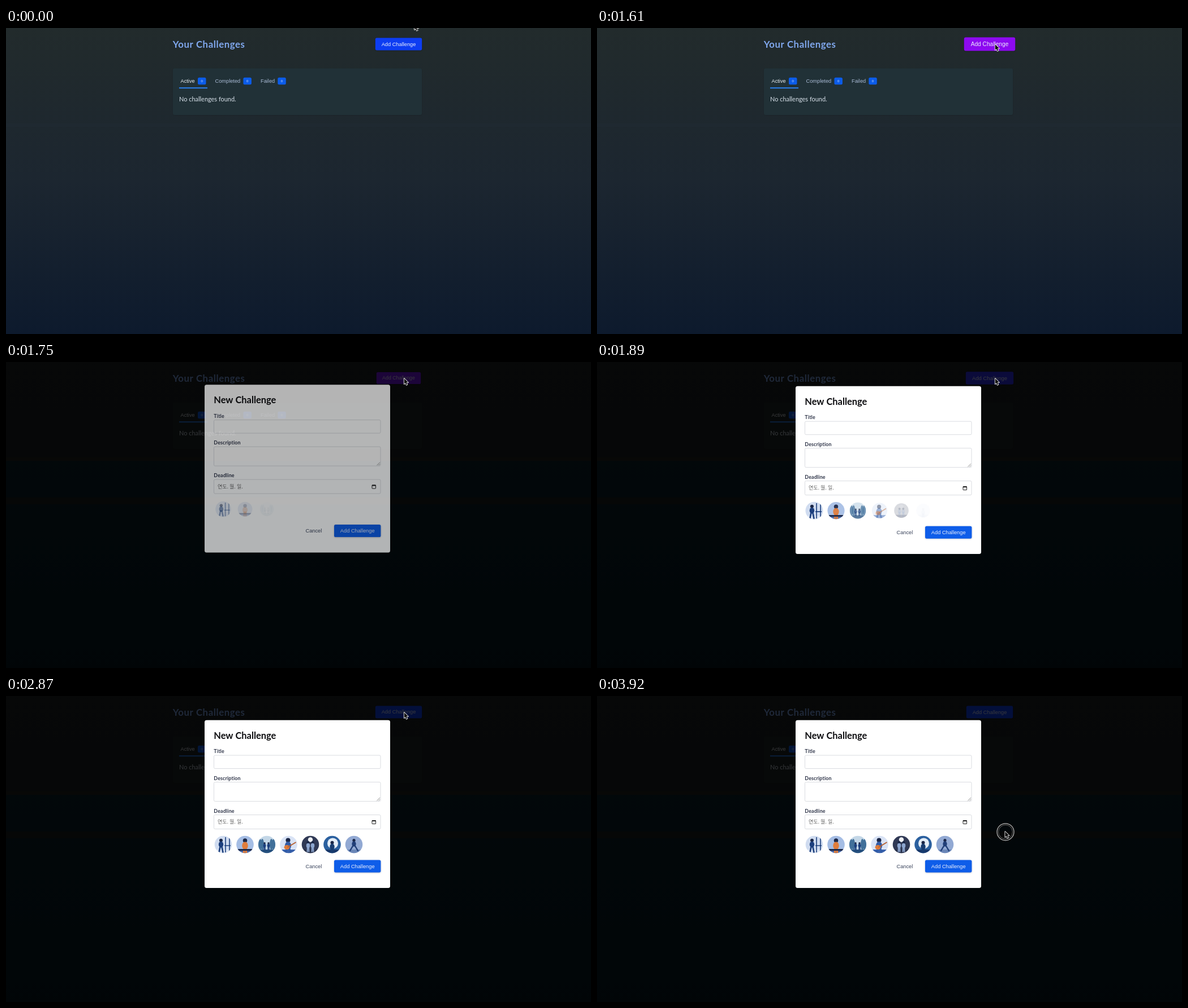
Recreate the animation shown at these times as an HTML page with a canvas. Size 1034 by 542 pixels, loop 3990 ms.

```html
<!DOCTYPE html>
<html lang="en">
<head>
<meta charset="utf-8">
<title>Challenges</title>
<style>
  html, body { margin: 0; width: 100%; height: 100%; overflow: hidden; background: #1c262f; }
  canvas { display: block; width: 1034px; height: 542px; }
</style>
</head>
<body>
<canvas id="stage" width="1034" height="542"></canvas>
<script>
const W = 1034, H = 542, LOOP = 3990, STEP = 70;
const HOVER_IN = 210, HOVER_OUT = 1600, MODAL = 1650;
const stage = document.getElementById('stage').getContext('2d');
const layer = Object.assign(document.createElement('canvas'), { width: W, height: H }).getContext('2d');
let g = stage;

const SANS = '9.25px "Liberation Sans", Arial, sans-serif';
const SMALL = '6px "Liberation Sans", Arial, sans-serif';
const LATO = 'Lato, sans-serif';
const KOREAN = '9px "Noto Sans CJK KR", "Noto Sans CJK", sans-serif';

const clamp = v => Math.max(0, Math.min(1, v));
const mix = (a, b, p) => a + (b - a) * p;
const mixColor = (a, b, p) => `rgb(${a.map((v, i) => Math.round(mix(v, b[i], p)))})`;
const smooth = p => p * p * (3 - 2 * p);
const phase = (t, from, length) => clamp((t - from) / length);

// Underdamped spring progress from 0 to 1, time in ms
function spring(ms, stiffness, damping) {
  if (ms <= 0) return 0;
  const t = ms / 1000, d = damping / 2, w = Math.sqrt(stiffness - d * d);
  return 1 - Math.exp(-d * t) * (Math.cos(w * t) + d / w * Math.sin(w * t));
}

function text(str, x, y, font, color, spacing = 0, align = 'left') {
  g.font = font;
  g.fillStyle = color;
  g.textAlign = align;
  g.letterSpacing = spacing + 'px';
  g.fillText(str, x, y);
}

function rect(x, y, w, h, color) {
  g.fillStyle = color;
  g.fillRect(x, y, w, h);
}

function box(x, y, w, h, r, fill, stroke) {
  g.beginPath();
  g.roundRect(x, y, w, h, r);
  if (fill) { g.fillStyle = fill; g.fill(); }
  if (stroke) { g.strokeStyle = stroke; g.lineWidth = 1; g.stroke(); }
}

function raisedBox(x, y, w, h, r, fill, shade) {
  g.save();
  g.shadowColor = shade;
  g.shadowBlur = 2.5;
  g.shadowOffsetY = 0.7;
  box(x, y, w, h, r, fill);
  g.restore();
}

function oval(x, y, rx, ry, color) {
  g.beginPath();
  g.ellipse(x, y, rx, ry, 0, 0, 7);
  g.fillStyle = color;
  g.fill();
}

function line(color, width, x1, y1, x2, y2) {
  g.beginPath();
  g.moveTo(x1, y1);
  g.lineTo(x2, y2);
  g.strokeStyle = color;
  g.lineWidth = width;
  g.stroke();
}

function fade(y, height, ...colors) {
  const paint = g.createLinearGradient(0, y, 0, y + height);
  colors.forEach((c, i) => paint.addColorStop(i / (colors.length - 1), c));
  rect(0, y, W, height, paint);
}

function background(dimmed) {
  if (dimmed) {
    fade(0, 172, '#1c2022', '#1a1e20');
    fade(172, H - 172, '#08202a', '#05171f');
    rect(0, 169, W, 6, '#20201f');
    rect(0, 240, W, 12, '#1a1d1c');
  } else {
    fade(0, H, '#222b2c', '#1c2630', '#0d1a2d');
    rect(0, 169, W, 6, '#1f2931');
  }
}

function tab(label, x, badgeX, color) {
  text(label, x, 97.2, SANS, color);
  box(badgeX, 87.8, 14.5, 12.4, 2.5, '#0c5ce9');
  text('0', badgeX + 7.2, 96.2, SMALL, '#d3e2fb', 0, 'center');
}

function button(x, y, scale, fill, shade) {
  g.save();
  g.translate(x, y);
  g.scale(scale, scale);
  raisedBox(-41.2, -11, 82.4, 22, 2.7, fill, shade);
  text('Add Challenge', 0, 3, SANS, '#ebeffd', 0, 'center');
  g.restore();
}

function page(t) {
  const dimmed = t >= MODAL;
  const grow = spring(t - HOVER_IN, 500, 10) - spring(t - HOVER_OUT, 500, 10);
  const tint = smooth(phase(t, HOVER_IN, 200)) - smooth(phase(t, 1660, 340));
  background(dimmed);
  text('Your Challenges', 294.8, 34.5, 'bold 16.8px ' + LATO, '#80a8ee', 0.55);
  raisedBox(295, 71.5, 440, 82.5, 3, dimmed ? '#1d2527' : '#213137', 'rgba(0,0,0,.15)');
  tab('Active', 308.5, 339, '#e9eff5');
  tab('Completed', 369.5, 419.4, '#a9bbd6');
  tab('Failed', 450, 480.3, '#a9bbd6');
  rect(306, 105.2, 50, 2, '#2b7fef');
  text('No challenges found.', 306, 129.5, '10.94px ' + LATO, '#d8e1ea');
  button(694, 28.5, 1 + 0.1 * grow, mixColor([13, 61, 242], [141, 10, 240], tint), 'rgba(0,0,0,.25)');
  if (dimmed) rect(0, 0, W, H, 'rgba(0,0,0,.76)');
}

const NAVY = '#1c3f7d', INK = '#1b2747';

function person(x, y, size, coat, stance = 1.5) {
  oval(x, y - 6 * size, 2.5 * size, 2.5 * size, INK);
  oval(x, y, 3.5 * size, 4.5 * size, coat);
  for (const side of [-1, 1]) line(coat, 2.2 * size, x + side * size, y + 2 * size, x + side * stance * size, y + 12 * size);
}

// Sky, ground and subject of each round picture, centred on 0,0
const SCENES = [
  ['#d0dcf0', '#dfe7f4', () => {
    person(-4, 0, 1.2, NAVY, 3);
    for (const x of [4, 11]) line(NAVY, 1.6, x, -13, x, 14);
    line(NAVY, 1.6, 2, 2, 13, 2);
  }],
  ['#a5bde4', '#4a69a6', () => {
    person(0, 2, 1.5, '#e17d3c');
    rect(-15, 8, 30, 3, INK);
  }],
  ['#c4d7e7', '#244f7d', () => {
    for (const x of [-12, -8, 8, 12]) oval(x, 0, 3, 10, '#41709a');
    for (const x of [-4, 3]) person(x, 2, 0.7, NAVY);
  }],
  ['#d9e3f5', '#3a62ab', () => {
    person(-1, 2, 1.6, '#315ca7', 4);
    oval(-3, 5, 5, 4, '#df7a38');
    line('#b8602f', 2, -2, 5, 13, -4);
  }],
  ['#303955', '#27304a', () => {
    oval(0, -8.5, 4.2, 4.2, '#f1f3f7');
    for (const x of [-4, 4]) person(x, 2, 0.95, '#8da6cf');
  }],
  ['#2b609f', '#18386a', () => {
    oval(1, -2, 9.5, 9.5, '#e4edf7');
    person(0, 4, 1.2, '#173c70');
  }],
  ['#92a9d3', '#6a86b7', () => person(0, -1, 1.05, '#213f78', 7)]
];

function avatars(t) {
  SCENES.forEach(([sky, ground, subject], i) => {
    const p = spring(t - 1622 - 50 * i, 100, 10);
    if (p <= 0) return;
    g.save();
    g.globalAlpha = clamp(p);
    g.translate(384 + 38.5 * i, 263);
    g.scale(0.8 + 0.2 * p, 0.8 + 0.2 * p);
    g.beginPath();
    g.arc(0, 0, 15.3, 0, 7);
    g.clip();
    rect(-16, -16, 32, 32, sky);
    rect(-16, 9, 32, 7, ground);
    subject();
    g.restore();
  });
}

function field(label, top, height) {
  text(label, 367.3, top - 4, 'bold 8.9px ' + LATO, '#30364a', 0.15);
  box(367.5, top, 294.5, height, 2, '#fff', '#dadce1');
}

function calendarIcon(x, y) {
  box(x, y + 0.5, 6.5, 6, 0.5, null, '#222');
  rect(x, y, 6.5, 2, '#222');
}

function modal(t) {
  g = layer;
  g.clearRect(0, 0, W, H);
  g.save();
  g.translate(0, 20.5 * (1 - spring(t - 1590, 500, 25)));
  box(351, 42.7, 328, 297.2, 3.5, '#fff');
  text('New Challenge', 367.3, 75.5, 'bold 16.41px ' + LATO, '#0d0d10');
  field('Title', 105, 23.5);
  field('Description', 152.5, 34);
  field('Deadline', 210.5, 25);
  for (const inset of [0, 3]) line('#777', 0.8, 655.5 + inset, 185.5, 661, 180 + inset);
  text('연도. 월. 일.', 374, 226.3, KOREAN, '#656565');
  calendarIcon(647, 220);
  avatars(t);
  text('Cancel', 529.5, 304.5, SANS, '#39435b');
  button(621.2, 301.5, 1, '#0e5de9', 'rgba(20,40,90,.35)');
  g.restore();
  g = stage;
  g.globalAlpha = smooth(phase(t, 1610, 220));
  g.drawImage(layer.canvas, 0, 0);
  g.globalAlpha = 1;
}

// Glide to the button, rest, swing down to the left, then flick right
function pointerAt(t) {
  const arrive = 1 - (1 - phase(t, 0, 560)) ** 3;
  const swing = phase(t, 3150, 630);
  const flick = phase(t, 3780, 140);
  const x = mix(722, 703.7, arrive) - 126.7 * swing ** 7 + 144.3 * flick;
  const y = mix(-7, 29, arrive) + 221 * swing - 10 * flick;
  return [x, y];
}

function outlined(path, fill, edge) {
  g.lineJoin = 'round';
  g.strokeStyle = edge;
  g.lineWidth = 1.6;
  g.stroke(path);
  g.fillStyle = fill;
  g.fill(path);
}

const ARROW = new Path2D('M0 0V10.1L2.3 8L3.9 11.8L5.7 11L4.1 7.3H7.3Z');
const HAND = new Path2D();
HAND.roundRect(-0.6, 0.6, 1.9, 8, 1);
HAND.roundRect(-2.2, 5, 8.2, 6.8, 2.5);

function pointer(t) {
  const overButton = t >= HOVER_IN && t < 1610;
  g.save();
  g.translate(...pointerAt(t));
  if (overButton) outlined(HAND, '#fff', '#111');
  else outlined(ARROW, '#111', '#fff');
  g.restore();
}

function circle(x, y, r, color, width) {
  g.beginPath();
  g.arc(x, y, r, 0, 7);
  g.strokeStyle = color;
  g.lineWidth = width;
  g.stroke();
}

function clickRing(x, y, r, alpha) {
  g.globalAlpha = alpha;
  circle(x, y, r - 1.4, '#111', 2);
  circle(x, y, r, '#bcbcbc', 1.2);
  circle(x, y, r - 2.6, '#858585', 0.7);
  g.globalAlpha = 1;
}

function draw(t) {
  page(t);
  if (t >= MODAL) modal(t);
  if (t >= 1470 && t < 1610) clickRing(704.5, 29.5, 22, 0.6);
  if (t >= 3920) clickRing(722, 240.8, 15, 1);
  pointer(t);
}

const start = performance.now();
function tick() {
  const t = (performance.now() - start) % LOOP;
  draw(Math.floor(t / STEP) * STEP);
  requestAnimationFrame(tick);
}
tick();
</script>
</body>
</html>
```
